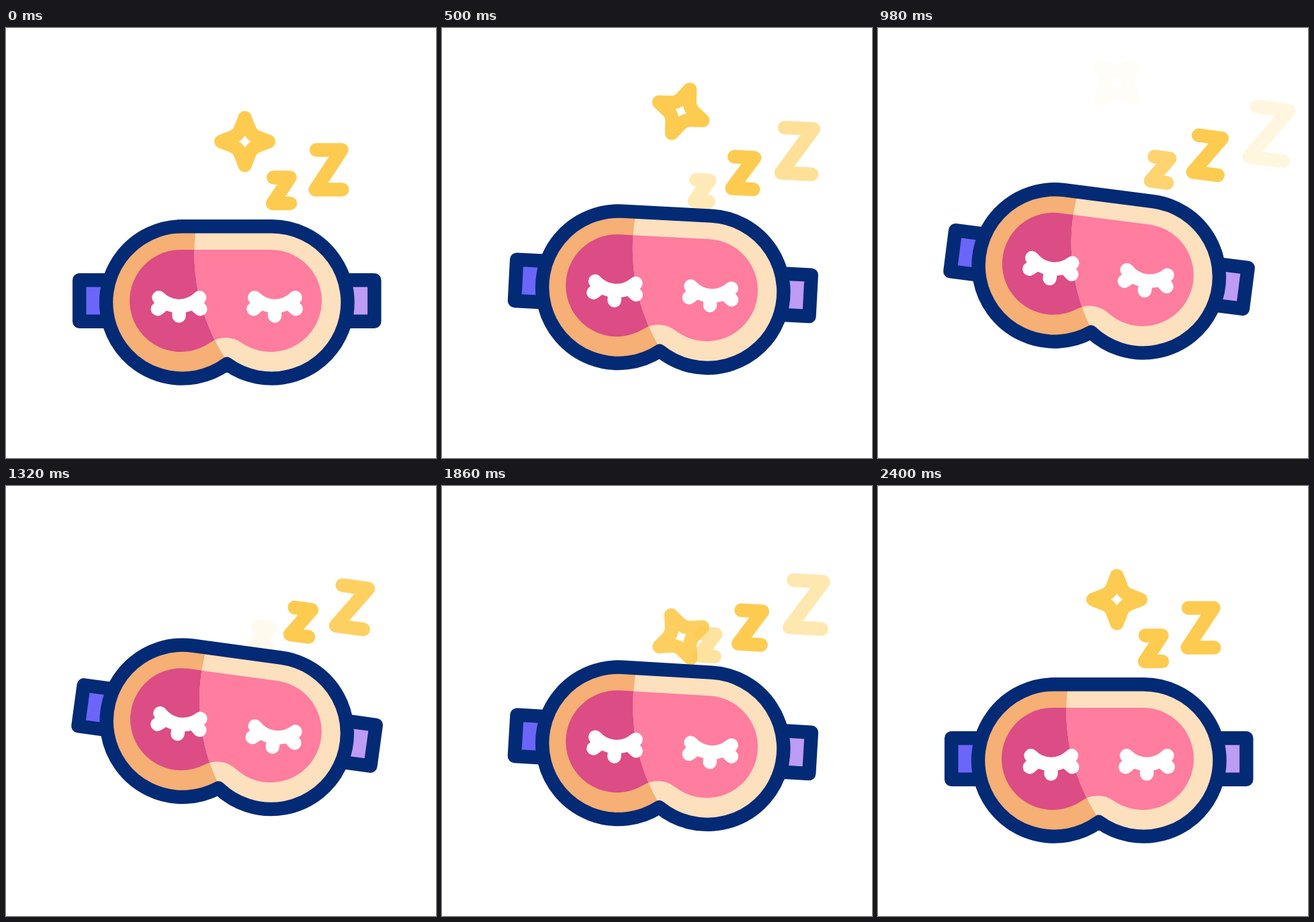
An HTML page that plays this animation: 640x640 px, repeating every 2420 ms.

```html
<!DOCTYPE html>
<html lang="en">
<head>
<meta charset="utf-8">
<title>Sleep mask</title>
<style>
  html, body { margin: 0; width: 100%; height: 100%; overflow: hidden; background: #fff; }
  svg { display: block; width: 100vw; height: 100vh; }
  .line { fill: none; stroke-width: 20.4; stroke-linecap: round; stroke-linejoin: round; }
  .gold { stroke: #fecb51; }
  .navy { stroke: #032a75; }
  .white { stroke: #fff; }
</style>
</head>
<body>
<svg viewBox="0 0 640 640">
  <defs>
    <clipPath id="lit"><circle cx="571.3" cy="335" r="291"/></clipPath>
    <path id="body" d="M262.2 295.2H395.3A113.2 113.2 0 1 1 328.75 500A113.2 113.2 0 1 1 262.2 295.2Z"/>
    <path id="pad" d="M260 330H394A76 76 0 1 1 350.6 468.4A41.4 41.4 0 0 0 303.4 468.4A76 76 0 1 1 260 330Z"/>
    <path id="eye" class="line white" d="M227.5 401.3C244.5 418 271 418 288 401.3M237 409L225.8 418.3M257.5 414V428.5M278.5 409L289.2 418.3"/>
  </defs>
  <path id="star" class="line gold"/>
  <g id="mask">
    <g id="zs"></g>
    <path class="line navy" style="fill:#6b65fa" d="M160 375.3H109.2V436.8H160"/>
    <path class="line navy" style="fill:#be9bf4" d="M497.5 375.3H548.3V436.8H497.5"/>
    <use href="#body" fill="#f6af74"/>
    <use href="#pad" fill="#dc4c85"/>
    <g clip-path="url(#lit)">
      <use href="#body" fill="#fde0be"/>
      <use href="#pad" fill="#ff7d9f"/>
    </g>
    <use href="#body" class="line navy"/>
    <use href="#eye"/>
    <use href="#eye" x="142.5"/>
  </g>
</svg>
<script>
const LOOP = 2420, STEP = 20, HALF = 1200;
const $ = id => document.getElementById(id);
const mix = (a, b, k) => a + (b - a) * k;
const clamp = v => Math.min(1, Math.max(0, v));

// One star arm, turned four times into a closed outline
const arm = [[0, -35.3], [6.5, -18.5], [8.6, -13], [13, -8.6], [18.5, -6.5]];
let starPath = '';
for (let q = 0; q < 4; q++) {
  const p = arm.map(([x, y]) => {
    for (let i = 0; i < q; i++) [x, y] = [-y, x];
    return x + ' ' + y;
  });
  starPath += `${q ? 'L' : 'M'}${p[0]}L${p[1]}C${p[2]} ${p[3]} ${p[4]}`;
}
$('star').setAttribute('d', starPath + 'Z');

// Stations along the drift: centre x, centre y, height, opacity
const stops = [
  [357.5, 270.5, 26.5, 0],
  [410, 241.8, 38.6, 1],
  [480.4, 211, 59, 1],
  [571, 165, 79.4, 0]
];
const letters = [0, 1, 2].map(() => {
  const el = document.createElementNS('http://www.w3.org/2000/svg', 'path');
  el.setAttribute('class', 'line gold');
  return $('zs').appendChild(el);
});

function zPath(x, y, h) {
  const at = (u, v) => `${x + u * h} ${y + v * h}`;
  return `M${at(-0.312, -0.5)}L${at(0.323, -0.5)}L${at(-0.337, 0.5)}L${at(0.337, 0.5)}`;
}

function draw(t) {
  const k = (t % HALF) / HALF;
  const rising = t < HALF;

  const s = 1 - Math.abs(t - HALF) / HALF;
  const ease = s * s * (3 - 2 * s);
  $('mask').setAttribute('transform',
    `translate(0 ${-51 * ease}) rotate(${8 * ease} 328.75 408.4)`);

  letters.forEach((el, i) => {
    const [x, y, h, o] = stops[i].map((v, j) => mix(v, stops[i + 1][j], k));
    el.setAttribute('d', zPath(x, y, h));
    el.setAttribute('opacity', o);
  });

  const back = t >= 2 * HALF;
  const y = back ? 169 : rising ? 169 - 108 * k : mix(292, 169, k);
  const turn = back ? 0 : 54 * (rising ? k : k - 1);
  $('star').setAttribute('transform', `translate(355.5 ${y}) rotate(${turn})`);
  $('star').setAttribute('opacity', clamp(rising ? (1000 - t) / 500 : (t - 1400) / 500));
}

const start = performance.now();
function tick() {
  const t = (performance.now() - start) % LOOP;
  draw(Math.floor(t / STEP) * STEP);
  requestAnimationFrame(tick);
}
draw(0);
requestAnimationFrame(tick);
</script>
</body>
</html>
```
